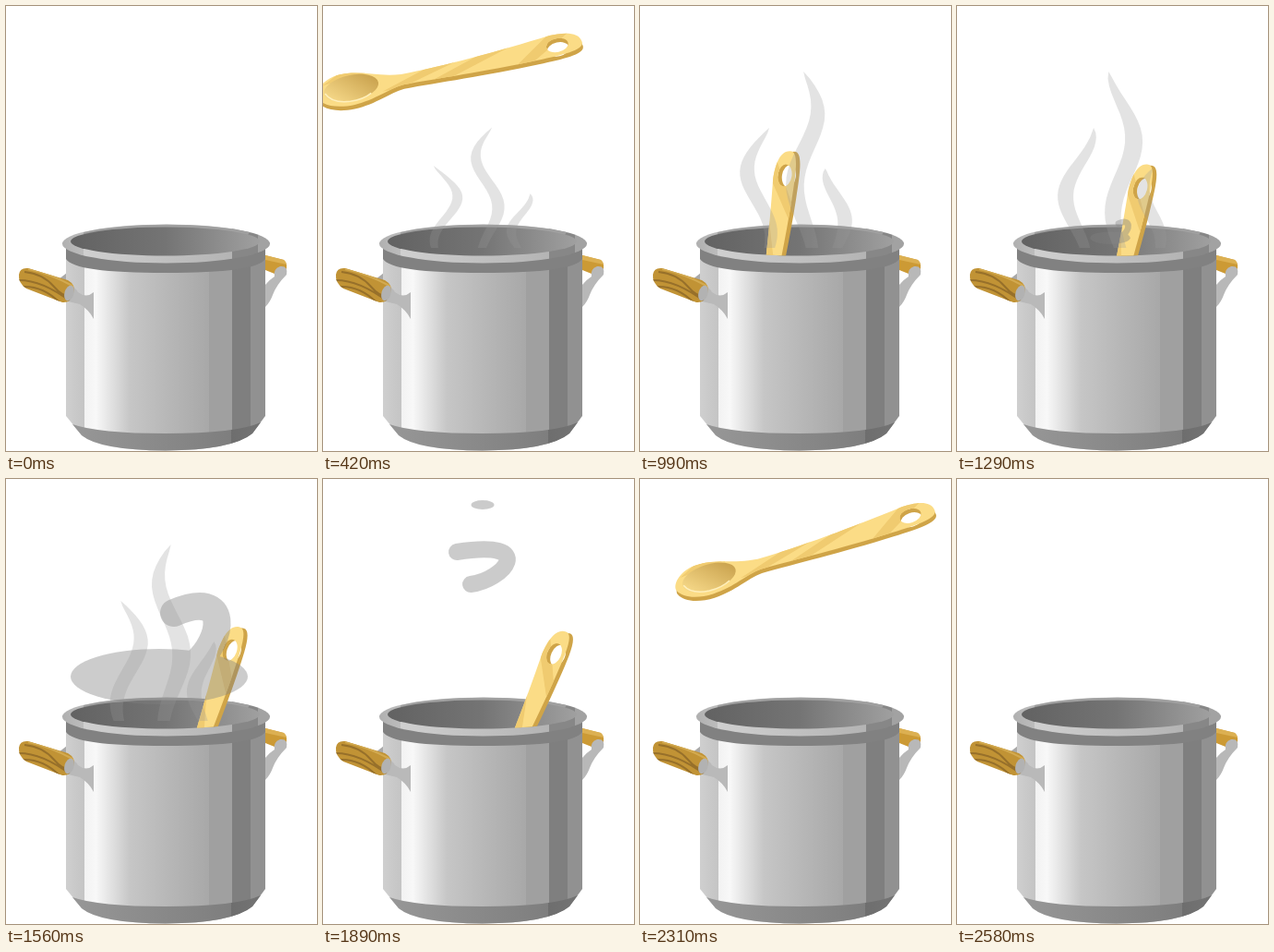
An HTML page for the animation above (2670 ms loop, 337 by 482 pixels).

```html
<!DOCTYPE html>
<html lang="en">
<head>
<meta charset="utf-8">
<title>Cooking pot</title>
<style>
html, body { margin: 0; width: 100%; height: 100%; overflow: hidden; background: #fff; }
svg { display: block; width: 100%; height: 100%; }
</style>
</head>
<body>
<svg viewBox="0 0 337 482">
  <defs>
    <linearGradient id="body" gradientUnits="userSpaceOnUse" x1="65" x2="281">
      <stop offset="0" stop-color="#cfcfcf"/><stop offset=".093" stop-color="#c4c4c4"/>
      <stop offset=".093" stop-color="#f2f2f2"/><stop offset=".15" stop-color="#f8f8f8"/>
      <stop offset=".32" stop-color="#c6c6c6"/><stop offset=".5" stop-color="#b8b8b8"/>
      <stop offset=".718" stop-color="#a8a8a8"/><stop offset=".718" stop-color="#a0a0a0"/>
      <stop offset=".833" stop-color="#a0a0a0"/><stop offset=".833" stop-color="#7f7f7f"/>
      <stop offset=".926" stop-color="#7f7f7f"/><stop offset=".926" stop-color="#919191"/>
    </linearGradient>
    <linearGradient id="base" gradientUnits="userSpaceOnUse" x1="65" x2="281">
      <stop offset="0" stop-color="#989898"/><stop offset=".83" stop-color="#7e7e7e"/>
      <stop offset=".83" stop-color="#6e6e6e"/><stop offset="1" stop-color="#747474"/>
    </linearGradient>
    <linearGradient id="rim" gradientUnits="userSpaceOnUse" x1="61" x2="286">
      <stop offset="0" stop-color="#b0b0b0"/><stop offset=".1" stop-color="#bcbcbc"/>
      <stop offset=".1" stop-color="#d0d0d0"/><stop offset=".4" stop-color="#c4c4c4"/>
      <stop offset=".82" stop-color="#b4b4b4"/><stop offset=".82" stop-color="#878787"/>
      <stop offset=".94" stop-color="#878787"/><stop offset=".94" stop-color="#a2a2a2"/>
    </linearGradient>
    <linearGradient id="hollow" gradientUnits="userSpaceOnUse" x1="70" x2="275">
      <stop offset="0" stop-color="#626262"/><stop offset=".5" stop-color="#747474"/>
      <stop offset="1" stop-color="#a0a0a0"/>
    </linearGradient>
    <linearGradient id="scoop" x1="1" x2="0" y1="0" y2=".5">
      <stop offset="0" stop-color="#c39a45"/><stop offset="1" stop-color="#f3d585"/>
    </linearGradient>
    <clipPath id="open"><path d="M0 0H337V255H275A102.500 15.500 0 0 1 70 255H0Z"/></clipPath>
    <path id="blade" fill-rule="evenodd" clip-rule="evenodd" d="M1 1C0 -12 -20 -13 -32 -13C-90 -8 -150 -5 -198 -6C-225 -9 -240 -20 -265 -20C-285 -18 -294 -6 -292 0C-288 10 -272 15.500 -255 15.500C-230 15 -215 6.500 -198 5.500C-160 6.500 -110 10.500 -50 10.500C-20 10.500 2 10 1 1ZM-38 -1A12 7.500 0 0 1 -14 -1A12 7.500 0 0 1 -38 -1Z"/>
    <clipPath id="face"><use href="#blade"/></clipPath>
    <path id="wood" d="M14 291Q15 283 24 284L67 297Q76 302 73 311Q70 322 61 321L22 306Q13 300 14 291Z"/>
    <clipPath id="grip"><use href="#wood"/></clipPath>
  </defs>

  <!-- far handle -->
  <path fill="#cc9a35" d="M281 270L301 275Q306 280 303 287L291 290L281 286Z"/>
  <path fill="#dcb052" d="M281 270L301 275Q304 277 304 280L281 275Z"/>
  <path fill="#b8b8b8" d="M281 302Q286 296 291 293Q289 285 297 282Q306 281 304 291Q293 302 289 313Q286 321 281 326Z"/>
  <path fill="#a9a9a9" d="M57 296L66 289V300Z"/>

  <!-- pot -->
  <path fill="url(#body)" d="M65 262H281V444L267 463Q245 481 173 481.500Q101 481 82 465L65 444Z"/>
  <path fill="url(#base)" d="M72 453Q100 463 173 463Q250 463 276 451L267 463Q245 481 173 481.500Q101 481 82 465Z"/>
  <path fill="#818181" d="M65 262H281V274Q272 289 173 289Q74 289 65 274Z"/>
  <ellipse cx="173.500" cy="257.500" rx="112.500" ry="21" fill="url(#rim)"/>
  <path fill="#a0a0a0" d="M84 245A112.500 20.500 0 0 1 264 245L262 248Q172 232 84 249Z"/>
  <ellipse cx="172.500" cy="255" rx="102.500" ry="15.500" fill="url(#hollow)"/>

  <g clip-path="url(#open)">
    <g id="spoon">
      <use href="#blade" y="4.500" fill="#cfa448"/>
      <g clip-path="url(#face)">
        <rect x="-300" y="-25" width="310" height="50" fill="#fbdc86"/>
        <path fill="#f0cb70" d="M-8 -14L-60 14H-78L-34 -14ZM-70 -12L-150 10H-175L-100 -12ZM-125 -10L-200 8H-222L-165 -8ZM-225 -16L-262 -22L-284 -12Z"/>
      </g>
      <ellipse cx="-254" cy="-3" rx="30" ry="14" fill="url(#scoop)"/>
      <path fill="none" stroke="#fff0bd" stroke-width="1.500" d="M-283 -3Q-278 9 -258 11Q-244 12 -234 7"/>
    </g>
    <g id="cloud" opacity=".4" fill="#808080" stroke="#808080">
      <ellipse id="bank" stroke="none"/>
      <path id="plume" fill="none" stroke-linecap="round"/>
      <ellipse id="puff" cx="173" cy="28" stroke="none"/>
    </g>
    <g id="steam" fill="#969696" fill-opacity=".27"><path/><path/><path/></g>
  </g>

  <!-- near handle -->
  <path fill="#b9b9b9" d="M63 302Q73 301 78 310Q87 317 95 310V339Q90 329 80 323L63 319Z"/>
  <use href="#wood" fill="#c19335"/>
  <g clip-path="url(#grip)" fill="none" stroke="#97702a" stroke-width="2">
    <path d="M12 297Q38 296 70 320M20 288Q40 290 52 304T74 313M18 304Q40 303 58 321"/>
    <path stroke="#d3aa50" d="M24 285Q46 289 74 304"/>
  </g>
  <ellipse cx="68.500" cy="311" rx="5" ry="8.500" transform="rotate(17 68.500 311)" fill="#b2b2b2"/>
</svg>

<script>
const LOOP = 2670, STEP = 30, BASE = 262;
const $ = id => document.getElementById(id);
const set = (el, attrs) => {
  for (const name in attrs) el.setAttribute(name, attrs[name]);
};
const mix = (a, b, k) => a + (b - a) * k;
const ease = (t, a, b) => {
  const k = Math.min(1, Math.max(0, (t - a) / (b - a)));
  return k * k * (3 - 2 * k);
};

// smooth track through keys of the form [time, ...values]
function track(keys, t) {
  const last = keys.length - 1;
  if (t <= keys[0][0]) return keys[0].slice(1);
  if (t >= keys[last][0]) return keys[last].slice(1);
  const i = keys.findIndex(key => key[0] > t) - 1;
  const a = keys[i], b = keys[i + 1], h = b[0] - a[0], k = (t - a[0]) / h;
  const slope = (j, c) => j < 1 || j >= last ? 0
    : (keys[j + 1][c] - keys[j - 1][c]) / (keys[j + 1][0] - keys[j - 1][0]);
  return a.slice(1).map((v, n) => {
    const c = n + 1, rest = 1 - k;
    return mix(v, b[c], k * k * (3 - 2 * k))
      + h * k * rest * (slope(i, c) * rest - slope(i + 1, c) * k);
  });
}

// time, handle tip x and y, angle
const spoonKeys = [
  [90, 660, 34, -6], [360, 300, 36, -9], [690, 321, 44, -36], [780, 285, 9, -62],
  [870, 215, 22, -80], [990, 162, 158, -81], [1560, 252, 161, -71], [1890, 262, 166, -66],
  [2070, 268, 70, -64], [2160, 297, 24, -46], [2310, 318, 33, -17.5], [2400, 294, 36, -9],
  [2550, 660, 34, -5]
];

const wisps = [
  { x: 131, top: 132, amp: 14, wave: 1.1, phase: 2.6, width: 17 },
  { x: 179, top: 71, amp: 12, wave: .85, phase: -.13, width: 20 },
  { x: 213, top: 176, amp: 10, wave: 1.3, phase: -1.8, width: 16 }
];

// a tapered ribbon along a sine that travels upwards
function wispPath(w, t) {
  const grow = ease(t, 120, 600), left = [], right = [];
  for (let s = 0; s <= 1.001; s += .04) {
    const angle = 2 * Math.PI * s / w.wave + w.phase + .0168 * (t - 990);
    const x = w.x + w.amp * (1.25 - .5 * s) * Math.sin(angle);
    const y = mix(BASE, mix(w.top, BASE, s), grow);
    const half = w.width / 2 * Math.sin(2.4 * s ** .7) * grow;
    left.unshift(`${(x - half).toFixed(1)} ${y.toFixed(1)}`);
    right.push(`${(x + half).toFixed(1)} ${y.toFixed(1)}`);
  }
  return `M${[...right, ...left].join('L')}Z`;
}

// control points of the plume while broad and while thin
const broad = [[182, 145], [245, 118], [235, 175], [205, 200]];
const thin = [[145, 79], [235, 65], [195, 110], [160, 114]];

function drawCloud(t) {
  const grow = ease(t, 1170, 1560), lift = ease(t, 1560, 1890), fade = ease(t, 1890, 2070);
  const pts = broad.map(([x, y], i) => [
    mix(mix(mix(173, x, grow), thin[i][0], lift), 173, fade),
    mix(mix(mix(BASE, y, grow), thin[i][1], lift), 32, fade)
  ]);
  set($('plume'), {
    d: `M${pts[0]}C${pts.slice(1).join(' ')}`,
    'stroke-width': mix(30 * grow, 18, lift) * (1 - fade)
  });
  set($('bank'), {
    cx: mix(166, 172, lift), cy: mix(mix(BASE, 214, grow), 110, lift),
    rx: 96 * grow * (1 - lift), ry: 30 * grow * (1 - lift)
  });
  const size = ease(t, 1770, 1880) - ease(t, 1900, 2010);
  set($('puff'), { rx: 12.5 * size, ry: 5 * size });
  set($('cloud'), { visibility: grow && fade < 1 ? 'visible' : 'hidden' });
}

function draw(t) {
  const [x, y, angle] = track(spoonKeys, t);
  set($('spoon'), { transform: `translate(${x} ${y}) rotate(${angle})` });
  wisps.forEach((w, i) => set($('steam').children[i], { d: wispPath(w, t) }));
  set($('steam'), { opacity: 1 - ease(t, 1650, 1830) });
  drawCloud(t);
}

function frame() {
  const t = performance.now() % LOOP;
  draw(Math.floor(t / STEP) * STEP);
  requestAnimationFrame(frame);
}
frame();
</script>
</body>
</html>
```
